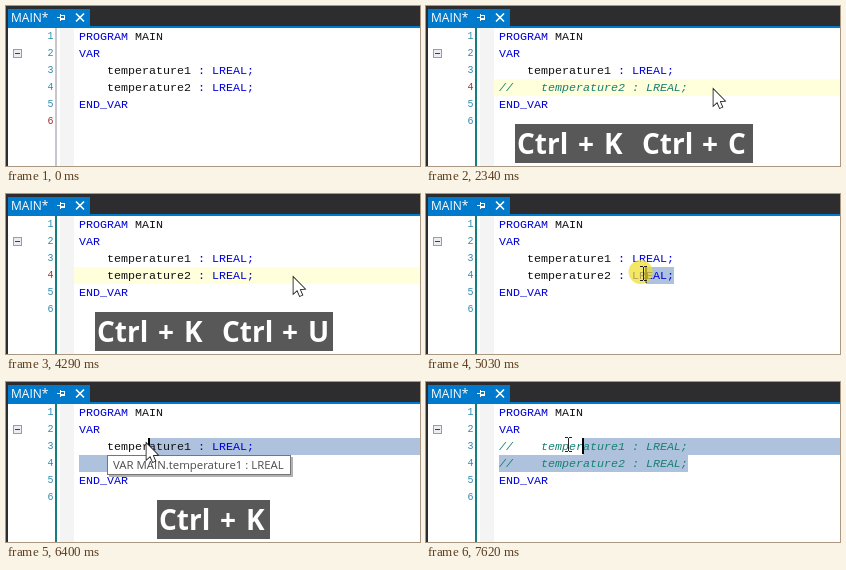
Recreate the animation shown at these times as an HTML page with a canvas. Size 414 px wide and 160 px high, loop 8000 ms.

```html
<!DOCTYPE html>
<html lang="en">
<head>
<meta charset="utf-8">
<title>Comment shortcut</title>
<style>
html, body { margin: 0; width: 100%; height: 100%; overflow: hidden; background: #fff; }
canvas { display: block; width: 414px; height: 160px; }
</style>
</head>
<body>
<canvas id="stage" width="414" height="160"></canvas>
<script>
const ctx = document.getElementById('stage').getContext('2d');
const LOOP = 8000, LEFT = 73, CHAR = 7, ROW = 17, TOP = 22, END_COL = 25;
const MONO = '11.667px "Liberation Mono", monospace';
const SANS = '"Open Sans", "Noto Sans", sans-serif';
const BLUE = '#0000d8', INK = '#101014', COMMENT = '#178072', SELECTION = '#aec2dd';
const FRAME = '#2d2d30', ACCENT = '#007acc';

const colX = col => LEFT + col * CHAR;
const rowY = row => TOP + (row - 1) * ROW;
const within = (t, ...spans) => spans.some(([from, to]) => t >= from && t < to);

// Time, x, y of the pointer's hot spot
const path = [
  [330, 318, 156], [610, 289, 84], [4600, 289, 84], [4740, 262, 83],
  [5100, 194, 77], [5310, 153, 67], [5380, 142, 62]
];

// Time the key badge changes, number of words shown, last key
const badges = [
  [1280, 1], [1680, 3], [1810, 6, 'C'], [2560, 0],
  [3220, 1], [3620, 3], [3760, 6, 'U'], [4560, 0],
  [6130, 1], [6400, 3], [6600, 6, 'C'], [7350, 0]
];
const wordX = [0, 61, 87, 125, 185, 211];
const badgeBox = { 1: [181, 54], 3: [151, 113], 6: [89, 238] };

function rect(x, y, w, h, color) {
  ctx.fillStyle = color;
  ctx.fillRect(x, y, w, h);
}

function text(str, x, y, color, font) {
  ctx.font = font;
  ctx.fillStyle = color;
  ctx.fillText(str, x, y);
}

function polyline(points, color, width, close) {
  ctx.beginPath();
  points.forEach(([x, y]) => ctx.lineTo(x, y));
  if (close) ctx.closePath();
  ctx.strokeStyle = color;
  ctx.lineWidth = width;
  ctx.stroke();
}

function pointerAt(t) {
  const start = t < 4560 ? 330 : 4560;
  const time = start + Math.floor((t - start) / 70) * 70;
  const i = path.findIndex(p => p[0] > time);
  if (i < 0) return path[path.length - 1].slice(1);
  const [t0, x0, y0] = path[Math.max(0, i - 1)], [t1, x1, y1] = path[i];
  const k = t1 === t0 ? 0 : (time - t0) / (t1 - t0);
  return [x0 + (x1 - x0) * k, y0 + (y1 - y0) * k];
}

function drawTab() {
  rect(0, 0, 414, TOP, FRAME);
  rect(0, TOP, 2, 138, FRAME);
  rect(2, 3, 82, 17, ACCENT);
  rect(2, 20, 412, 2, ACCENT);
  text('MAIN*', 5, 16, '#fff', '12px ' + SANS);
  rect(51, 11, 3, 1, '#fff');
  rect(54, 8, 1, 7, '#fff');
  rect(55, 9, 4, 1, '#fff');
  rect(58, 9, 1, 5, '#fff');
  rect(55, 12, 4, 2, '#fff');
  polyline([[70, 7.5], [78, 15.5]], '#fff', 1.6);
  polyline([[78, 7.5], [70, 15.5]], '#fff', 1.6);
}

function drawGutter(focused, activeRow) {
  rect(54, TOP, 14, 138, '#f4f4f4');
  rect(49, TOP, 2, 138, focused ? '#128080' : '#c6c6cc');
  for (let row = 1; row <= 6; row++) {
    const color = row === activeRow ? '#a03030' : '#2f8db0';
    text(row, 41.5, rowY(row) + 11, color, '10px "Liberation Mono", monospace');
  }
  rect(7, 43, 9, 9, '#9c9ca4');
  rect(8, 44, 7, 7, '#ececf2');
  rect(9, 47, 5, 1, '#3c3c50');
}

function codeLine(row, parts) {
  for (const [col, str, color] of parts) {
    text(str, colX(col), rowY(row) + 12, color, MONO);
  }
}

function declaration(row, name, commented) {
  if (commented) {
    text(`//    ${name} : LREAL;`, LEFT, rowY(row) + 12, COMMENT, 'italic ' + MONO);
  } else {
    codeLine(row, [[4, name, INK], [17, ':', BLUE], [19, 'LREAL;', BLUE]]);
  }
}

function drawSelection(row, col, endCol) {
  if (row === 3) rect(colX(col), rowY(3), 414 - colX(col), ROW, SELECTION);
  const x = row === 3 ? LEFT : colX(col);
  rect(x, rowY(4), colX(endCol) - x, ROW, SELECTION);
}

function drawTooltip() {
  rect(103, 75, 184, 20, 'rgba(0,0,0,.3)');
  rect(101, 73, 184, 20, '#767676');
  rect(102, 74, 182, 18, '#fff');
  text('VAR MAIN.temperature1 : LREAL', 107, 86.5, '#4c4c4c', '11.4px ' + SANS);
}

function drawBadge(t) {
  const [, count, key] = badges.filter(b => b[0] <= t).pop() || [0, 0];
  if (!count) return;
  const [x, w] = badgeBox[count];
  rect(x, 118, w, 39, '#585858');
  ['Ctrl', '+', 'K', 'Ctrl', '+', key].slice(0, count).forEach((word, i) =>
    text(word, x + 2 + wordX[i], 148, '#fff', 'bold 28px ' + SANS));
}

function drawArrow(x, y) {
  const shape = [[0, 0], [0, 16], [3.7, 12.6], [6.3, 18.5], [8.8, 17.4], [6.3, 11.7], [11.2, 11.3]]
    .map(([dx, dy]) => [x + dx, y + dy]);
  polyline(shape, '#111', 1.6, true);
  ctx.fillStyle = '#fff';
  ctx.fill();
}

function drawIBeam(x, y) {
  x = Math.round(x);
  y = Math.round(y);
  rect(x, y - 6, 1, 13, '#222');
  for (const dy of [-7, 7]) {
    rect(x - 3, y + dy, 3, 1, '#222');
    rect(x + 1, y + dy, 3, 1, '#222');
  }
}

function draw(t) {
  const focused = t >= 610, selecting = t >= 4740;
  const bothCommented = t >= 6600;
  const secondCommented = bothCommented || within(t, [1810, 3760]);
  const [px, py] = pointerAt(t);

  let row = focused ? 4 : 6, col = END_COL;
  if (selecting) {
    row = py < rowY(4) ? 3 : 4;
    col = Math.min(END_COL, Math.round((px - LEFT) / CHAR));
  }
  if (secondCommented) col += 2;

  rect(0, 0, 414, 160, '#fff');
  drawTab();
  drawGutter(focused, selecting ? 0 : row);
  if (selecting) drawSelection(row, col, END_COL + (bothCommented ? 2 : 0));
  else if (focused) rect(68, rowY(4), 346, ROW, '#ffffdc');

  codeLine(1, [[0, 'PROGRAM', BLUE], [8, 'MAIN', INK]]);
  codeLine(2, [[0, 'VAR', BLUE]]);
  declaration(3, 'temperature1', bothCommented);
  declaration(4, 'temperature2', secondCommented);
  codeLine(5, [[0, 'END_VAR', BLUE]]);

  if (within(t, [610, 1350], [1810, 2340], [2690, 3150], [3760, 4290],
      [4740, 5860], [6400, 7080], [7550, LOOP])) {
    rect(colX(col) - 1, rowY(row), 2, 16, '#000');
  }
  if (within(t, [5930, 6600])) drawTooltip();
  drawBadge(t);

  if (within(t, [610, 830], [4740, 5660])) {
    ctx.fillStyle = 'rgba(238,222,40,.72)';
    ctx.beginPath();
    ctx.arc(px - 2, py - 1, 12, 0, 7);
    ctx.fill();
  }
  if (within(t, [1810, 4600], [5380, 6600])) drawArrow(px - 1.5, py - 0.5);
  else if (t >= 330) drawIBeam(px, py);
}

function tick() {
  draw(performance.now() % LOOP);
  requestAnimationFrame(tick);
}
tick();
</script>
</body>
</html>
```
